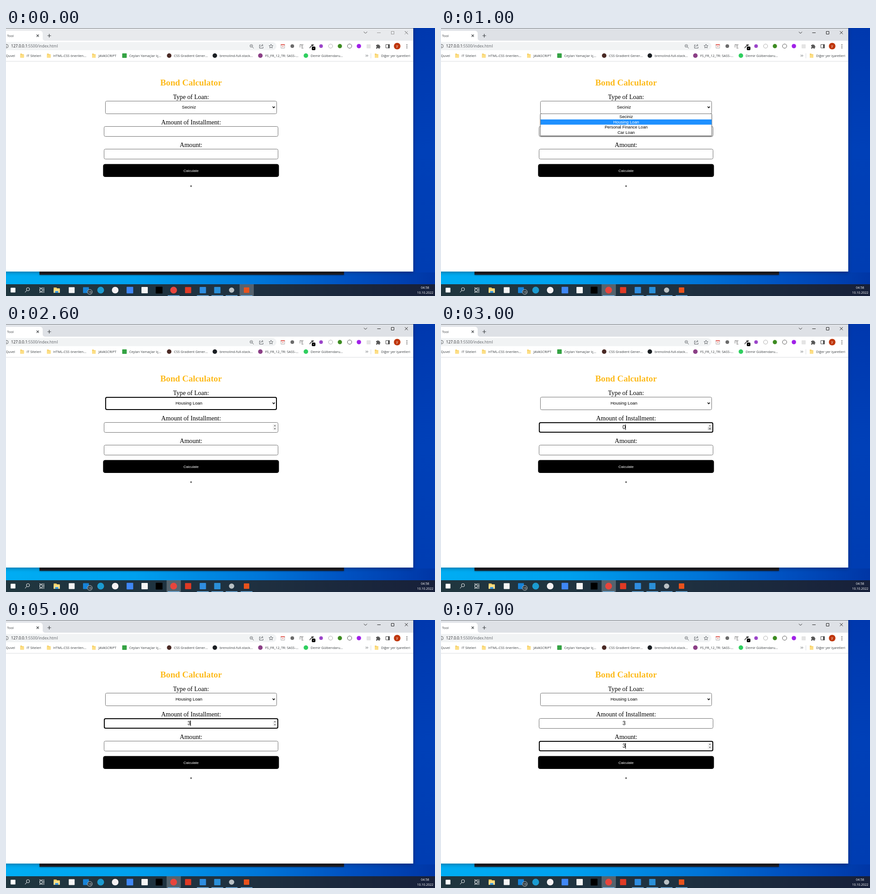
An HTML page for the animation above (8000 ms loop, 947x592 px).

```html
<!DOCTYPE html>
<html lang="tr">
<head>
<meta charset="utf-8">
<title>Bond Calculator</title>
<style>
  html, body { margin: 0; width: 100%; height: 100%; overflow: hidden; background: #fff; }
  svg { display: block; width: 100vw; height: 100vh; }
  text { white-space: pre; }
  .ui { font-family: "Open Sans", "Noto Sans", sans-serif; font-size: 7.5px; fill: #3c4043; }
  .url { font-size: 8.53px; fill: #202124; }
  .clock { font-size: 7px; fill: #fff; text-anchor: middle; }
  .serif { font-family: "Liberation Serif", serif; font-size: 14.08px; text-anchor: middle; }
  .title { font-size: 19.2px; font-weight: bold; fill: #fdba1a; }
  .sans { font-family: "Liberation Sans", sans-serif; font-size: 9.6px; text-anchor: middle; }
  .opt { font-size: 9.25px; }
  .num { font-size: 12px; }
  .line { fill: none; stroke: #5f6368; stroke-width: 1; }
  .box { fill: #fff; stroke: #6f6f6f; }
  .focus { fill: none; stroke: #000; stroke-width: 2; }
</style>
</head>
<body>
<svg viewBox="0 0 947 592" preserveAspectRatio="none">
  <defs>
    <linearGradient id="sky">
      <stop offset="0" stop-color="#00adf3"/>
      <stop offset=".3" stop-color="#00a0ee"/>
      <stop offset=".6" stop-color="#0075d8"/>
      <stop offset=".8" stop-color="#0050c0"/>
      <stop offset="1" stop-color="#0036a6"/>
    </linearGradient>
    <linearGradient id="side" x2="0" y2="1">
      <stop offset="0" stop-color="#0038ae"/>
      <stop offset=".5" stop-color="#0040b8"/>
      <stop offset="1" stop-color="#003db2"/>
    </linearGradient>
    <linearGradient id="bar">
      <stop offset="0" stop-color="#20363f"/>
      <stop offset=".55" stop-color="#1f3140"/>
      <stop offset="1" stop-color="#17203a"/>
    </linearGradient>
    <filter id="soft" x="-5%" y="-10%" width="110%" height="125%">
      <feDropShadow dx="0" dy="1.5" stdDeviation="1.5" flood-opacity=".4"/>
    </filter>
    <filter id="shade" x="-2%" y="-2%" width="104%" height="106%">
      <feDropShadow dx="0" dy="2" stdDeviation="4" flood-opacity=".35"/>
    </filter>
    <g id="folder">
      <path d="M-4-4.5h3.5l1 1.5h3.5v7.5h-8z" fill="#f6d169"/>
      <path d="M-4-1.5h8v6h-8z" fill="#fddf87"/>
    </g>
    <g id="spin">
      <path d="M-4.5-7h9v14h-9z" fill="#f0f0f0"/>
      <path d="M-2-2.5h4l-2-2.3zM-2 2.5h4l-2 2.3z" fill="#444"/>
    </g>
  </defs>

  <!-- desktop -->
  <path d="M0 530h947v36h-947z" fill="url(#sky)"/>
  <path d="M890 0h57v540h-57z" fill="url(#side)"/>
  <path d="M74 530h672v15h-672z" fill="#1d1f22" filter="url(#soft)"/>

  <!-- browser window -->
  <path d="M-20-20h919v558h-919z" fill="#fff" filter="url(#shade)"/>
  <path d="M0 0h899v28h-899z" fill="#dee1e6"/>
  <path d="M0 0h899v28h-899z" fill="#e8eaed" data-t="0-1000"/>
  <path d="M0 0h899v1h-899z" fill="#70757a"/>
  <path d="M0 6h75a6 6 0 0 1 6 6v11a5 5 0 0 0 5 5h-86z" fill="#fff"/>
  <text class="ui" x="2.3" y="19.7">Tool</text>
  <path class="line" d="M67.5 14.5l5 5m0-5l-5 5M91.500 17h8m-4-4v8" style="stroke:#3c4043;stroke-width:1.2"/>
  <g fill="none" stroke="#222">
    <path id="caption" d="M790 8.500l3.500 3.500 3.500-3.500M819.500 10.500h7.500M850.500 7.500h6v6h-6zM880.500 7l6.500 6.500m0-6.500l-6.500 6.500"/>
  </g>
  <g fill="none" stroke="#999" data-t="0-1000"><use href="#caption"/>
    <path d="M790 8.500l3.500 3.500 3.500-3.500M819.500 10.500h7.500M850.500 7.500h6v6h-6zM880.500 7l6.500 6.500m0-6.500l-6.500 6.500"/>
  </g>

  <!-- address row -->
  <path d="M0 31h588a9 9 0 0 1 0 18h-588z" fill="#f1f3f4"/>
  <g class="line">
    <circle cx="1" cy="40" r="4"/><path d="M1 39.500v3M1 37v1"/>
    <circle cx="541.500" cy="39.500" r="3"/><path d="M540 39.500h3M544 42l3 3"/>
    <path d="M562 37.500h-2.500v7h8v-3M562 42c.5-3 2-4 5-4m-2-2.200l2.500 2.200-2.500 2.200"/>
    <path d="M585 35.800l1.300 2.900 3.100.3-2.300 2.100.7 3.100-2.800-1.700-2.800 1.700.7-3.100-2.300-2.100 3.100-.3z"/>
    <path d="M607 36.500h8v8h-8z" stroke="#aaa"/><path d="M606.500 37h9" stroke="#e0574f" stroke-width="2"/><path d="M609 41h4" stroke="#e0574f"/>
    <path d="M649 43v-6.500h7.500M651 39h5m-2.500 0v5.500m-1 0h4" stroke="#777"/>
    <path d="M670.500 44.500l1-2 4.500-4.500m-2-1.500l3.500 3.500" stroke="#333" stroke-width="1.500"/><path d="M676.500 38.500l2-2" stroke="#333" stroke-width="3"/>
    <circle cx="716.500" cy="40" r="4.500" stroke="#aaa"/>
    <circle cx="758.500" cy="40" r="4.700" stroke="#555"/>
    <path d="M838.500 36.500h8v7.500h-8z" stroke="#444"/>
  </g>
  <path d="M843.500 36h3.500v8.500h-3.500z" fill="#444"/>
  <path d="M817 37.500h2.500a1.500 1.500 0 0 1 3 0h2.500v2.500a1.500 1.500 0 0 1 0 3v2.500h-2.500a1.500 1.500 0 0 0-3 0h-2.500v-2.500a1.500 1.500 0 0 0 0-3z" fill="#555"/>
  <circle cx="632" cy="40" r="4" fill="#6b6b6b"/>
  <rect x="675" y="41" width="8" height="8" rx="2" fill="#000"/><path d="M678 45h2" stroke="#fff"/>
  <circle cx="695.500" cy="40" r="4" fill="#9b45c9"/>
  <circle cx="737" cy="40" r="4.700" fill="#3d8b21"/>
  <circle cx="779" cy="40" r="4.800" fill="#a020e8"/>
  <rect x="796" y="36" width="9" height="9" rx="1" fill="#e4e4e4"/>
  <circle cx="863.500" cy="40" r="7.300" fill="#bf360c"/>
  <text class="ui" x="863.500" y="42.300" text-anchor="middle" style="fill:#fff">y</text>
  <g fill="#444"><circle cx="885" cy="37" r="1"/><circle cx="885" cy="40.500" r="1"/><circle cx="885" cy="44" r="1"/></g>
  <text class="ui url" x="11.300" y="43.300">127.0.0.1<tspan fill="#5f6368">:5500/index.html</tspan></text>

  <!-- bookmarks -->
  <g id="marks"></g>
  <path class="line" d="M794 59l2 2.200-2 2.200m3-4.400l2 2.200-2 2.200"/>
  <path d="M805.500 56v11M0 73.500h899" stroke="#dadce0"/>

  <!-- form -->
  <text class="serif title" x="408.500" y="127">Bond Calculator</text>
  <text class="serif" x="408.500" y="157">Type of Loan:</text>
  <text class="serif" x="408.500" y="213">Amount of Installment:</text>
  <text class="serif" x="408.500" y="263">Amount:</text>
  <rect class="box" x="219.500" y="161.500" width="378" height="28" rx="3"/>
  <rect class="box" x="216.500" y="217.500" width="384" height="22" rx="3"/>
  <rect class="box" x="216.500" y="267.500" width="384" height="22" rx="3"/>
  <path d="M588.500 173.500l2.500 2.800 2.500-2.800" fill="none" stroke="#000" stroke-width="1.500"/>
  <rect x="214.300" y="300.500" width="388.200" height="28.500" rx="4.500"/>
  <text class="sans" x="408.500" y="317.800" style="font-size:8px;fill:#fff">Calculate</text>
  <path d="M407.500 348h2v2.500h-2z" fill="none" stroke="#333"/>

  <text class="sans" x="403.800" y="178.300" data-t="0-2000">Seciniz</text>
  <text class="sans" x="403.800" y="178.300" data-t="2000-8000">Housing Loan</text>
  <rect class="focus" x="220" y="162" width="377" height="27" rx="3" data-t="2000-3000"/>

  <g data-t="1000-2000">
    <path d="M219.500 189.500h378v48.500h-378z" fill="#fff" stroke="#767676" filter="url(#soft)"/>
    <path d="M220 202h377.500v11.500h-377.500z" fill="#1e90ff"/>
    <g id="options"></g>
  </g>

  <use href="#spin" x="593.500" y="228" data-t="2000-6000"/>
  <g data-t="3000-5000">
    <path d="M589 228h9v7h-9z" fill="#d0d0d0"/><path d="M591.500 230.500h4l-2 2.300z" fill="#333"/>
  </g>
  <rect class="focus" x="217" y="218" width="383" height="21" rx="3" data-t="3000-6000"/>
  <text class="sans num" x="404" y="232" data-t="3000-5000">0</text>
  <text class="sans num" x="404" y="232" data-t="5000-8000">3</text>
  <path d="M407.500 221.500v13" stroke="#000" data-t="3000-6000"/>

  <use href="#spin" x="593.500" y="278" data-t="6000-8000"/>
  <g data-t="6000-7000">
    <path d="M589 271h9v7h-9z" fill="#d0d0d0"/><path d="M591.500 275.500h4l-2-2.300z" fill="#333"/>
  </g>
  <rect class="focus" x="217" y="268" width="383" height="21" rx="3" data-t="6000-8000"/>
  <text class="sans num" x="404" y="282" data-t="7000-8000">3</text>
  <path d="M407.500 271.500v13" stroke="#000" data-t="7000-8000"/>

  <!-- taskbar -->
  <path d="M0 566h947v26h-947z" fill="url(#bar)"/>
  <path d="M515.500 566h31.500v26h-31.500z" fill="#fff" opacity=".24" data-t="0-1000"/>
  <path d="M354.500 566h31.500v26h-31.500z" fill="#fff" opacity=".24" data-t="1000-8000"/>
  <g fill="none" stroke="#fff">
    <circle cx="48.500" cy="577" r="3.500"/><path d="M46 579.500l-4 4.500"/>
    <path d="M74.500 576.500h6v5h-6zM74.500 573v1.500h6v-1.500M74.500 585v-1.500h6v1.500M83.500 573v12M82.500 578.500h2"/>
  </g>
  <use href="#folder" transform="translate(112 579) scale(1.700 1.300)"/>
  <path d="M108.500 581h7v4h-7z" fill="#3b9be0"/>
  <g id="apps"></g>
  <circle cx="185" cy="583" r="5.500" fill="#26343d" stroke="#dfe5e8" stroke-width=".8"/>
  <text class="ui clock" x="185" y="585.500" style="font-size:6.500px">13</text>
  <text class="ui clock" x="925" y="575.600">04:58</text>
  <text class="ui clock" x="925.300" y="587">10.10.2022</text>
</svg>
<script>
const NS = "http://www.w3.org/2000/svg";
const byId = id => document.getElementById(id);

function add(parent, tag, attrs, text) {
  const el = document.createElementNS(NS, tag);
  for (const key in attrs) el.setAttribute(key, attrs[key]);
  if (text) el.textContent = text;
  parent.append(el);
}

function dot(parent, x, y, r, fill, round) {
  if (round) add(parent, "circle", { cx: x, cy: y, r, fill });
  else add(parent, "rect", { x: x - r, y: y - r, width: 2 * r, height: 2 * r, rx: 1, fill });
}

// text x, label, icon: "folder", a colour for a disc, or "#" colour plus "s" for a square
const marks = [
  [-0.5, "Quvel"],
  [45.5, "IT Siteleri", "folder"],
  [104.5, "HTML-CSS önerilen...", "folder"],
  [204, "JAVASCRIPT", "folder"],
  [272, "Ceylan Yamaçlar Iç...", "#35a344s"],
  [370.700, "CSS Gradient Gener...", "#4a2a25"],
  [471.5, "brenolind-full-stack...", "#1b1f23"],
  [572, "FS_FR_12_TR: SASS-...", "#8b3f86"],
  [672.5, "Demir Gülbendaru...", "#2fcf5f"],
  [828, "Diğer yer işaretleri", "folder"]
];
for (const [x, label, icon] of marks) {
  const row = byId("marks");
  add(row, "text", { class: "ui", x, y: 63.8 }, label);
  if (icon === "folder") add(row, "use", { href: "#folder", x: x - 10, y: 61 });
  else if (icon) dot(row, x - 10.5, 61, 5, icon.slice(0, 7), !icon.endsWith("s"));
}

["Seciniz", "Housing Loan", "Personal Finance Loan", "Car Loan"].forEach((label, i) =>
  add(byId("options"), "text",
    { class: "sans opt", x: 408.7, y: 199 + i * 11.6, fill: i === 1 ? "#fff" : "#000" }, label));

// centre x, half size, colour, round
const apps = [
  [15.5, 5.3, "#fff"], [145, 6.5, "#f4f4f4"], [176.5, 6.5, "#1683d8"],
  [209, 7.5, "#1b9bd0", 1], [241, 7.3, "#f5f1f3", 1], [273.5, 7.3, "#3f87f5"],
  [306, 7, "#f5f5f5"], [338, 7.5, "#000"], [370, 7.5, "#e8453c", 1],
  [402, 6.8, "#e03a25"], [434.5, 7, "#2f8de0"], [466.5, 7, "#2a8fd8"],
  [498, 5.8, "#b9c0c4", 1], [531, 6, "#e8521c"]
];
for (const [x, r, fill, round] of apps) {
  dot(byId("apps"), x, 579, r, fill, round);
  if (x === 370 || x > 430)
    add(byId("apps"), "rect", { x: x - 13, y: 590.5, width: 26, height: 1.5, fill: "#76b9ed" });
}

const timed = [...document.querySelectorAll("[data-t]")].map(el =>
  [el, ...el.dataset.t.split("-").map(Number)]);
const LOOP = 8000;
const start = performance.now();

function draw() {
  const t = (performance.now() - start) % LOOP;
  for (const [el, from, to] of timed)
    el.style.display = t >= from && t < to ? "" : "none";
  requestAnimationFrame(draw);
}
draw();
</script>
</body>
</html>
```
